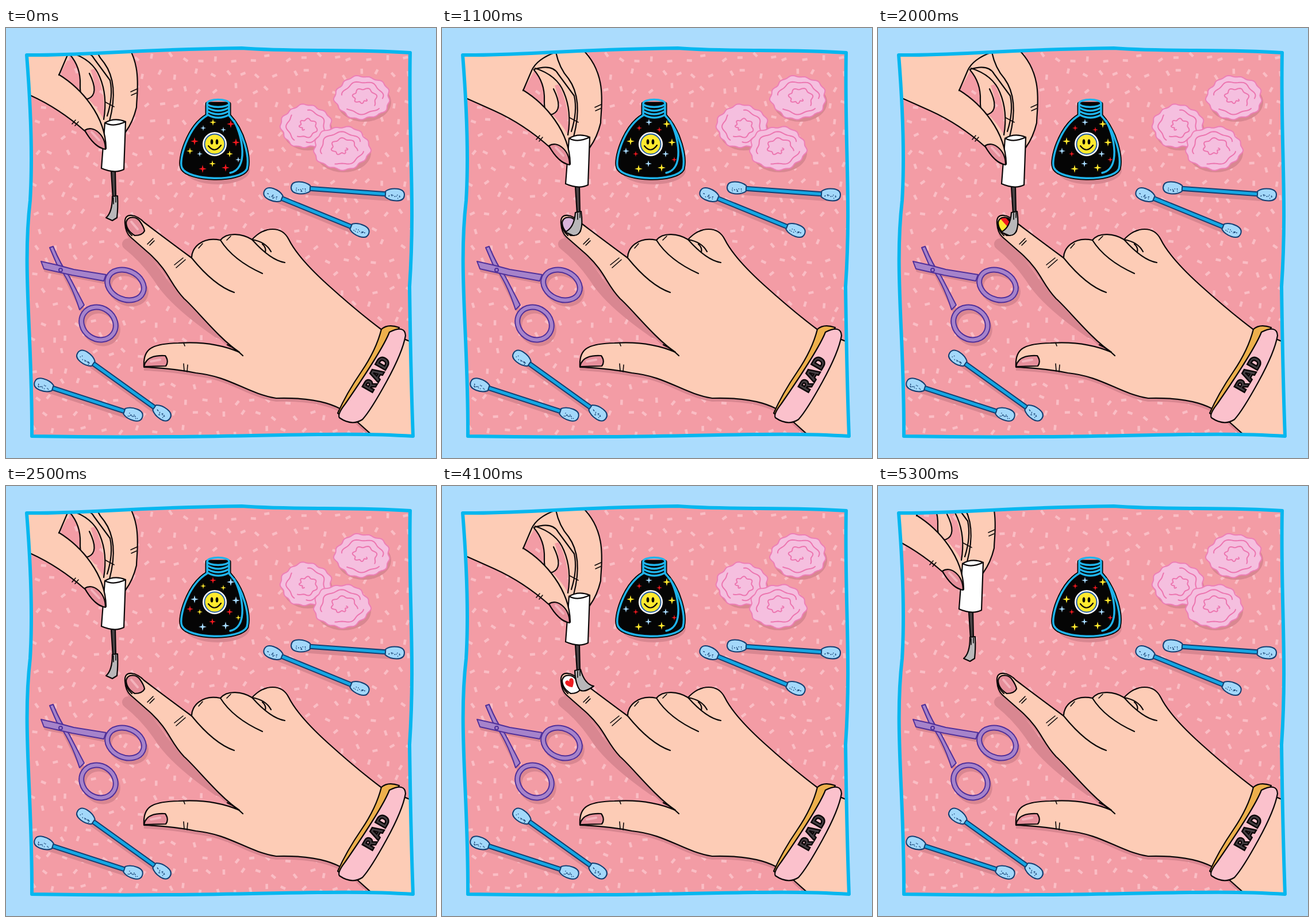
Animation, 748 px wide and 748 px high, one loop 5400 ms. Source, as an HTML page:

```html
<!DOCTYPE html>
<html lang="en">
<head>
<meta charset="utf-8">
<title>Nail art</title>
<style>
  html, body { margin: 0; width: 100%; height: 100%; overflow: hidden; background: #abdcfd; }
  svg { display: block; width: 100%; height: 100%; }
  path { stroke-linecap: round; stroke-linejoin: round; }
  .skin { fill: #fdccb6; }
  .ink { fill: none; stroke: #0b0708; stroke-width: 2.2; }
  .thin { stroke-width: 1.6; }
  .both { stroke: #0b0708; stroke-width: 2.2; }
  .shade { fill: #d98791; }
  .nail { fill: #e68f9b; }
  .shine { fill: none; stroke: #f4b3bc; stroke-width: 4; }
  .cyan { fill: none; stroke: #1fb4ec; stroke-width: 3.5; }
  .blade { fill: #a683ca; stroke: #50309a; stroke-width: 2; }
  .stick { fill: #14a7e4; stroke: #143f72; stroke-width: 2; }
  .tip { fill: #a3d8fa; stroke: #143f72; stroke-width: 2; }
  .fluff { fill: #f5bfdf; stroke: #ee7fb6; stroke-width: 2; }
  .curl { fill: none; stroke: #ec76b0; stroke-width: 2; }

  #hand { animation: reach .9s step-end infinite; }
  #rest { animation: rest .9s step-end infinite; }
  #left { animation: left .9s step-end infinite; }
  #right { animation: right .9s step-end infinite; }
  #paint { animation: paint .9s step-end infinite; }
  #lilac { animation: lilac 5.4s step-end infinite; }
  #stripes { animation: stripes 5.4s step-end infinite; }
  #heart { animation: heart 5.4s step-end infinite; }
  .star { animation: twinkle .3s step-end infinite; }

  @keyframes reach {
    0%, 77.77% { transform: translate(-49px, -27px); }
    11.1% { transform: none; }
    88.88%, 100% { transform: translate(-74px, -57px); }
  }
  @keyframes rest { 0%, 77.77%, 100% { opacity: 1; } 11.1% { opacity: 0; } }
  @keyframes left {
    0%, 33.32%, 55.54%, 77.77%, 100% { opacity: 0; }
    22.21%, 44.43%, 66.65% { opacity: 1; }
  }
  @keyframes right {
    0%, 22.21%, 44.43%, 66.65%, 100% { opacity: 0; }
    11.1%, 33.32%, 55.54% { opacity: 1; }
  }
  @keyframes paint { 0%, 77.77%, 100% { opacity: 0; } 22.21% { opacity: 1; } }
  @keyframes lilac { 0%, 33.33%, 66.66%, 100% { opacity: 0; } 16.66%, 50% { opacity: 1; } }
  @keyframes stripes { 0%, 50%, 100% { opacity: 0; } 33.33%, 83.33% { opacity: 1; } }
  @keyframes heart { 0%, 66.66% { opacity: 1; } 16.66%, 83.33%, 100% { opacity: 0; } }
  @keyframes twinkle { 0%, 100% { fill: #ffe92e; } 33.3% { fill: #f5191f; } 66.6% { fill: #a8dcff; } }
</style>
</head>
<body>
<svg viewBox="0 0 748 748">
  <defs>
    <path id="edge" d="M36 47C140 48 200 38 410 35C500 42 600 36 703 43C700 200 712 300 702 450Q704 600 708 710C560 700 400 716 45 710C46 540 28 420 42 300Q48 200 36 47Z"/>
    <path id="palm" d="M207 340C205 318 228 325 240 338Q285 372 323 400C322 384 340 362 373 369C385 354 412 358 428 368C450 344 480 344 492 368Q508 400 560 447T655 526L720 552V720H650L612 686C585 655 540 642 470 644C420 636 390 606 330 600Q290 592 240 590C238 560 250 549 300 548Q360 544 406 564C370 540 330 488 310 471C285 445 285 425 250 393L217 364Q208 356 207 340Z"/>
    <path id="nailShape" d="M209 338C212 326 226 328 232 335Q240 346 241 353Q237 361 224 361Q209 352 209 338Z"/>
    <g id="loops" fill="none">
      <ellipse cx="208" cy="447" rx="33" ry="25" transform="rotate(24 208 447)"/>
      <ellipse cx="161" cy="514" rx="31" ry="27" transform="rotate(35 161 514)"/>
    </g>
    <clipPath id="mat"><use href="#edge"/></clipPath>
    <clipPath id="nailArea"><use href="#nailShape"/></clipPath>
  </defs>

  <g clip-path="url(#mat)">
    <rect width="748" height="748" fill="#f39ca5"/>
    <path id="confetti" stroke="#fabdc4" stroke-width="4.5" style="stroke-linecap:butt"/>
    <g id="cotton"></g>
    <g id="swabs"></g>

    <!-- scissors -->
    <g stroke="#d98791" stroke-width="8" transform="translate(4 7)">
      <use href="#loops"/>
      <path d="M66 414 172 435M80 385 130 486"/>
    </g>
    <path class="blade" d="M76 382 82 380Q95 412 110 432L136 482 128 490Q112 440 88 410Z"/>
    <path class="blade" d="M61 406Q90 412 118 420L174 429 170 440 115 430 66 419Z"/>
    <use href="#loops" stroke="#50309a" stroke-width="10"/>
    <use href="#loops" stroke="#a683ca" stroke-width="6"/>
    <circle class="blade" cx="95" cy="421" r="3"/>

    <!-- bottle -->
    <ellipse class="shade" cx="368" cy="248" rx="56" ry="24"/>
    <path fill="#050505" stroke="#050505" stroke-width="7" d="M350 152C316 172 300 230 306 243C316 266 408 268 419 245C424 225 414 180 388 152V132H350Z"/>
    <path class="cyan" d="M350 152C316 172 300 230 306 243C316 266 408 268 419 245C424 225 414 180 388 152"/>
    <ellipse class="cyan" cx="369" cy="131" rx="19" ry="6.5"/>
    <path class="cyan" d="M350 132V151M388 132V151M351 139Q369 149 387 139M351 145Q369 155 387 145M351 151Q369 161 388 151"/>
    <path class="cyan thin" d="M397 162C412 190 422 245 390 252"/>
    <g id="stars"></g>
    <circle cx="363" cy="202" r="19" fill="#ffe92e" stroke="#fff" stroke-width="4"/>
    <circle cx="363" cy="202" r="17.5" fill="none" stroke="#245ba0" stroke-width="2"/>
    <ellipse cx="358" cy="198" rx="2.3" ry="4.5"/><ellipse cx="367" cy="198" rx="2.3" ry="4.5"/>
    <path class="ink" d="M352 205Q363 219 374 204"/>

    <!-- resting hand -->
    <use href="#palm" class="shade" y="6"/>
    <path fill="none" stroke="#d98791" stroke-width="20" d="M212 376Q245 402 270 440T370 530"/>
    <use href="#palm" class="skin both"/>
    <path class="ink" d="M323 400Q362 448 397 460M373 369Q395 404 446 427M428 368Q460 404 485 408M428 368Q452 372 461 389M446 376Q453 382 451 390M385 551Q400 558 412 570"/>
    <path class="ink thin" d="M246 376 256 366M250 378 258 370M293 412 308 400M296 417 312 403M309 584 310 597M316 586 315 598M309 548 311 553M335 383 342 375M384 369 391 362M447 354 455 351"/>
    <path class="nail both" d="M240 589Q244 568 277 570Q284 580 278 588Z"/>
    <path class="shine" d="M252 580 268 577M218 337 229 350"/>
    <use href="#nailShape" class="nail"/>
    <path class="shine" d="M218 337 229 350"/>
    <g id="paint" clip-path="url(#nailArea)">
      <rect id="lilac" x="200" y="320" width="50" height="50" fill="#d9b5dc"/>
      <g id="stripes" transform="rotate(48 222 342)">
        <rect x="190" y="310" width="70" height="70" fill="#ffe92e"/>
        <rect x="190" y="310" width="70" height="32" fill="#ef1c20"/>
        <rect x="190" y="310" width="70" height="24" fill="#080808"/>
      </g>
      <g id="heart">
        <rect x="200" y="320" width="50" height="50" fill="#fff"/>
        <path fill="#ef1c20" transform="translate(223 343) rotate(-30)" d="M0 8C-11 0-8-8-3-7Q0-6 0-3Q1-7 4-7C9-7 10 0 0 8Z"/>
      </g>
    </g>
    <use href="#nailShape" class="ink"/>
    <path class="ink" d="M208 342Q209 352 219 361"/>

    <!-- bracelet -->
    <path fill="#edb04c" class="both" d="M653 524Q664 514 684 521L600 686 577 670Q592 636 618 598T653 524Z"/>
    <path fill="#fbc1cc" class="both" d="M667 529Q694 516 695 535Q690 564 662 615T620 681Q602 693 580 678Q576 672 590 654Q655 560 667 529Z"/>
    <text transform="translate(645 601) rotate(-60)" text-anchor="middle" dy="10" font-family="Inter, Arial, sans-serif" font-weight="900" font-size="28" letter-spacing="2" fill="#453f43" stroke="#0b0708" stroke-width="2.5">RAD</text>

    <!-- painting hand -->
    <g id="hand">
      <path class="skin" fill-rule="evenodd" d="M-20-20H247V42C290 80 276 140 276 165Q270 190 257 208L222 230 187 207Q142 168 91 144T-20 95ZM160 75 142 108Q200 150 219 186Q224 140 203 98L196 100Q212 142 192 150Q176 144 178 125T169 86Z"/>
      <path class="ink" d="M243 36C290 80 276 140 276 165Q270 190 257 208M198 42Q165 54 156 74L141 109M160 73Q179 95 178 125T192 150Q212 142 194 106M162 70Q200 82 212 112Q226 145 219 186M160 72Q192 62 202 80L230 118Q236 145 225 180M198 42Q204 70 220 88Q246 124 229 189"/>
      <path class="ink thin" d="M266 138 277 133M267 144 276 140M222 156 237 164"/>

      <path fill="#4b4446" class="both thin" d="M232 276 235 323H240L239 276Z"/>
      <g fill="#b9b7b9">
        <path id="rest" class="both" d="M234 320 243 319Q244 340 242 357L234 362 223 357Q234 348 234 320Z"/>
        <path id="left" class="both" d="M232 321 242 319Q248 362 228 361L214 355Q230 348 232 321Z"/>
        <path id="right" class="both" d="M231 321 241 319Q248 345 264 348Q248 360 240 355Q232 345 231 321Z"/>
      </g>
      <path class="ink thin" d="M236 322V333M240 321V330"/>
      <path fill="#fff" class="both" d="M221 192Q238 182 257 190L254 273Q238 281 215 271Z"/>
      <path class="ink" d="M221 192Q236 200 257 190"/>

      <path class="skin" d="M141 108C180 132 222 180 223 236Q206 240 187 207L150 170Z"/>
      <path class="ink" d="M141 108C180 132 222 180 223 236M-20 95Q40 121 91 144T187 207Q208 240 223 237"/>
      <path class="nail both" d="M186 205C200 195 222 212 222 238Q202 234 186 205Z"/>
      <path class="shine" d="M198 208 211 222"/>
      <path class="ink thin" d="M170 187 164 194M175 190 169 197"/>
    </g>
  </g>
  <use href="#edge" fill="none" stroke="#07b7ef" stroke-width="6"/>
</svg>

<script>
const $ = id => document.getElementById(id);

function add(parent, tag, attrs) {
  const el = document.createElementNS('http://www.w3.org/2000/svg', tag);
  for (const k in attrs) el.setAttribute(k, attrs[k]);
  return parent.appendChild(el);
}

let seed = 11;
const rnd = () => (seed = seed * 16807 % 2147483647) / 2147483647;

// Jittered grid of short dashes
let flecks = '';
for (let y = 46; y < 720; y += 27) {
  for (let x = 44 + y % 2 * 14; x < 720; x += 29) {
    const a = rnd() * Math.PI, dx = Math.cos(a) * 4.5, dy = Math.sin(a) * 4.5;
    flecks += `M${x + rnd() * 13 - dx} ${y + rnd() * 13 - dy}l${2 * dx} ${2 * dy}`;
  }
}
$('confetti').setAttribute('d', flecks);

// Lumpy ball with a spiral and two arcs inside
function cotton(x, y, rx, ry, turn) {
  const line = (from, to, size) => {
    const pts = [];
    for (let a = from; a < to; a += .08) {
      const r = size(a);
      pts.push([x + rx * r * Math.cos(a + turn), y + ry * r * Math.sin(a + turn)]);
    }
    return 'M' + pts.join('L');
  };
  const inner = (from, to, base, grow) =>
    add($('cotton'), 'path', { class: 'curl', d: line(from, to, a => base + grow * a + .04 * Math.sin(7 * a)) });
  add($('cotton'), 'ellipse', { class: 'shade', cx: x + 3, cy: y + 8, rx: rx - 3, ry: ry - 5 });
  add($('cotton'), 'path', {
    class: 'fluff',
    d: line(0, 2 * Math.PI, a => .95 + .03 * Math.sin(13 * a) + .03 * Math.sin(5 * a + 1)) + 'Z'
  });
  inner(0, 6.5, .16, .055);
  inner(2.8, 5.9, .7, 0);
  inner(.2, 1.9, .72, 0);
}
cotton(620, 121, 50, 39, .5);
cotton(522, 171, 46, 39, 2);
cotton(584, 209, 51, 39, 0);

function swab(x1, y1, x2, y2) {
  const len = Math.hypot(x2 - x1, y2 - y1);
  const turn = Math.atan2(y2 - y1, x2 - x1) * 180 / Math.PI;
  const pose = (dx, dy) => `translate(${x1 + dx} ${y1 + dy}) rotate(${turn})`;
  add($('swabs'), 'path', { d: `M0 0H${len}`, stroke: '#d98791', 'stroke-width': 10, transform: pose(3, 7) });
  const g = add($('swabs'), 'g', { transform: pose(0, 0) });
  add(g, 'rect', { class: 'stick', x: 10, y: -3.5, width: len - 20, height: 7 });
  for (const end of ['', `translate(${len} 0) scale(-1 1)`]) {
    const t = add(g, 'g', { transform: end });
    add(t, 'path', { class: 'tip', d: 'M17-5C8-12-16-14-16 0C-16 14 8 12 17 5Z' });
    for (let i = 0; i < 14; i++) {
      add(t, 'circle', { cx: -9 + rnd() * 20, cy: rnd() * 6, r: .8, fill: '#143f72' });
    }
  }
}
swab(464, 290, 616, 352);
swab(512, 278, 677, 290);
swab(138, 574, 272, 670);
swab(65, 621, 222, 672);

// Three groups of stars, each one colour step apart
const groups = [
  { r: 6, at: [[360, 164], [320, 214], [389, 219], [359, 236]] },
  { r: 7, at: [[391, 167], [328, 197], [400, 199], [342, 245], [382, 243]] },
  { r: 5, at: [[343, 174], [378, 177], [337, 219], [404, 229]] }
];
groups.forEach(({ r, at }, step) => {
  const k = r * .2, m = r - k;
  for (const [x, y] of at) {
    add($('stars'), 'path', {
      class: 'star', style: `animation-delay:${-step * 100}ms`,
      d: `M${x} ${y - r}l${k} ${m} ${m} ${k} ${-m} ${k} ${-k} ${m} ${-k} ${-m} ${-m} ${-k} ${m} ${-k}z`
    });
  }
});
</script>
</body>
</html>
```
